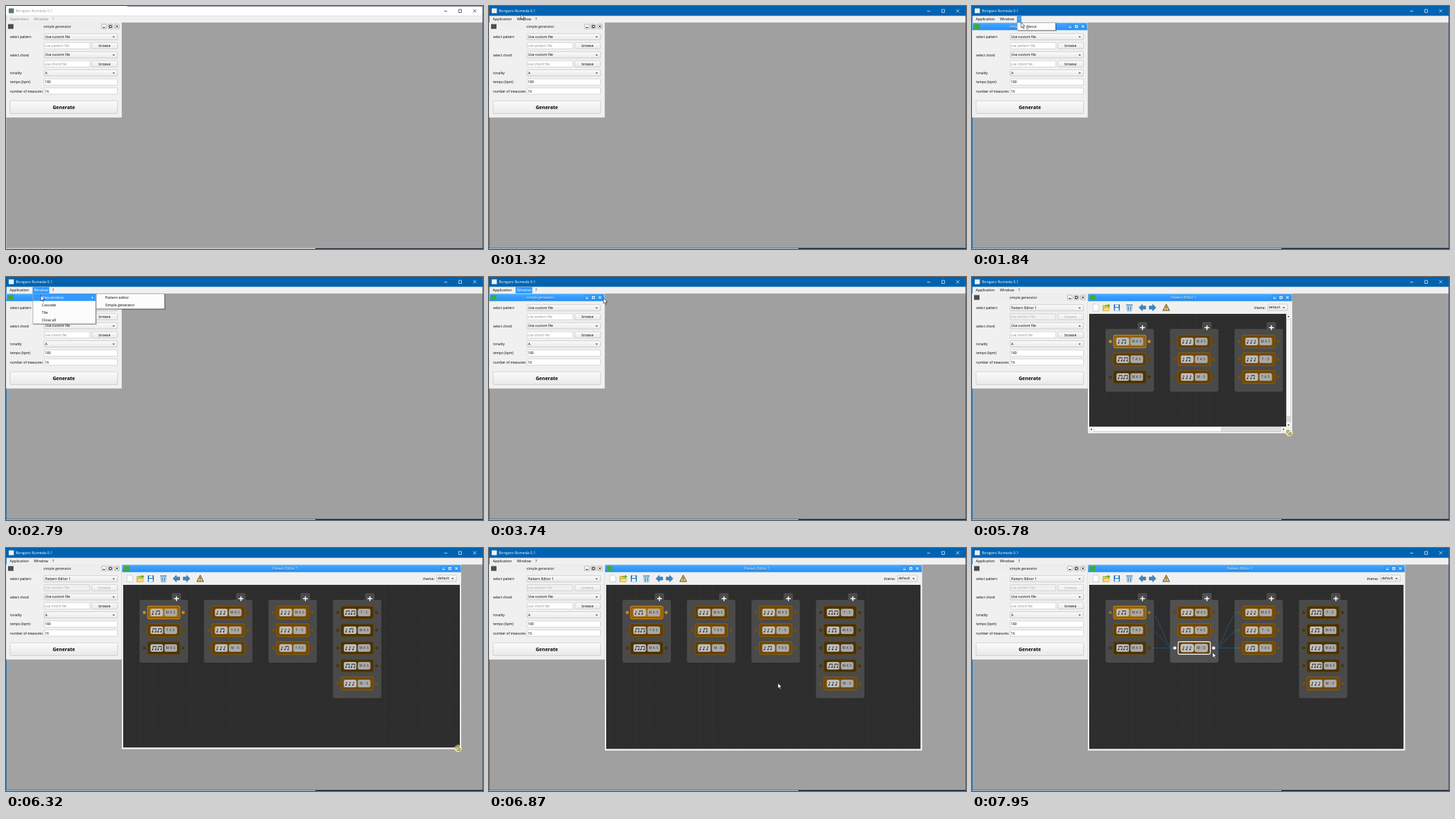
Write an HTML page that moves like this. It is 700 by 356 pixels and loops after 8000 ms.

```html
<!DOCTYPE html>
<html lang="en">
<head>
<meta charset="utf-8">
<title>Pattern editor demo</title>
<style>
  html, body { margin: 0; width: 100%; height: 100%; overflow: hidden; background: #a0a0a0; }
  svg { display: block; width: 700px; height: 356px; }
  text { font-family: "Open Sans", "Noto Sans", sans-serif; white-space: pre; }
</style>
</head>
<body>
<svg id="stage" viewBox="0 0 700 356" xmlns="http://www.w3.org/2000/svg">
  <defs>
    <linearGradient id="blue" x2="0" y2="1">
      <stop offset="0" stop-color="#52b0ff"/><stop offset=".25" stop-color="#3ba2ff"/><stop offset="1" stop-color="#2990f5"/>
    </linearGradient>
    <linearGradient id="btn" x2="0" y2="1">
      <stop offset="0" stop-color="#fbfbfb"/><stop offset="1" stop-color="#e9e9e9"/>
    </linearGradient>
    <pattern id="grid" width="18.9" height="18.9" x="177" y="57" patternUnits="userSpaceOnUse">
      <path d="M0 .25H18.9M.25 0V18.9" stroke="#343434" stroke-width=".6"/>
    </pattern>
  </defs>
  <g id="scene"></g>
</svg>
<script>
const LOOP = 8000;
const APP = 'Bongaro Rumeda 0.1';

// time, then the properties that change
const STEPS = [
  [0, { active: false, menu: '', hot: '', focus: '', item: -1, edges: false, sel: false }],
  [1320, { active: true }],
  [1450, { focus: 'gen' }],
  [1590, { menu: 'window', hot: 'window' }],
  [1840, { menu: 'help', hot: 'help' }],
  [2250, { menu: 'window', hot: 'window' }],
  [2380, { item: 0 }],
  [2660, { sub: true }],
  [3180, { subItem: 0 }],
  [3740, { menu: '', sub: false, item: -1 }],
  [3870, { hot: '', focus: 'edit', size: [395, 203] }],
  [4000, { linked: true }],
  [5650, { size: [432, 216] }],
  [5780, { size: [470, 229] }],
  [5930, { size: [570, 262] }],
  [6050, { size: [677, 292] }],
  [6320, { size: [668, 294.5] }],
  [6470, { size: [656, 297] }],
  [6600, { size: [641, 297] }],
  [6730, { size: [635.5, 296.6] }],
  [7390, { sel: true }],
  [7670, { edges: true }]
];

// time, x, y, shape: a(rrow), r(esize), p(ressed resize); none hides it
const POINTER = [
  [0], [370, 620, 343, 'a'], [500, 264, 66, 'a'], [630],
  [910, 47, 1, 'a'], [1040, 47, 8, 'a'], [1170, 47, 12, 'a'],
  [1590, 50, 15, 'a'], [1720, 62, 18, 'a'], [1840, 72, 24, 'a'], [2100, 70, 19, 'a'],
  [2250, 57, 18, 'a'], [2380, 53, 24, 'a'], [2530, 51, 27, 'a'],
  [3060, 85, 28, 'a'], [3180, 135, 27, 'a'], [3310, 162, 25, 'a'],
  [3590, 167, 27, 'a'], [3740, 168, 31, 'a'], [3870],
  [4280, 285, 71, 'a'], [4410, 350, 142, 'a'], [4540, 392, 190, 'a'],
  [4690, 392, 198, 'r'], [4820, 393, 204, 'r'], [4970, 392.5, 202, 'r'],
  [5240, 393, 203, 'p'], [6600],
  [6870, 424, 198, 'a'], [7000, 388, 181, 'a'], [7130, 360, 164, 'a'],
  [7260, 340, 153, 'a'], [7390, 332, 152, 'a'], [7950, 353, 153, 'a']
];

// columns of nodes: shade, notes, label
const COLUMNS = [
  ['O qb MAS', 'B bb TAS', 'D bb MAS'],
  ['B qqq MAS', 'M qb TAS', 'B qqq M-S'],
  ['M qqq MAS', 'M qqq T-S', 'M qb TAS'],
  ['D bb T-S', 'D qb MAS', 'D qqq MAS', 'D bb MAS', 'M qqq M-S']
];
const SHADES = {
  O: ['#a66c0b', '#d08c17'], M: ['#7a4f05', '#8f5f08'],
  B: ['#684303', '#7b5107'], D: ['#4d3403', '#5f4107']
};

const rect = (x, y, w, h, fill, more = '') =>
  `<rect x="${x}" y="${y}" width="${w}" height="${h}" fill="${fill}" ${more}/>`;
const path = (d, stroke, width = .7, fill = 'none') =>
  `<path d="${d}" stroke="${stroke}" stroke-width="${width}" fill="${fill}"/>`;
const text = (x, y, s, size = 5.1, fill = '#000', more = '') =>
  `<text x="${x}" y="${y}" font-size="${size}" fill="${fill}" ${more}>${s}</text>`;
const dot = (x, y, r, fill) => `<circle cx="${x}" cy="${y}" r="${r}" fill="${fill}"/>`;
const line = (c, w = .5) => `stroke="${c}" stroke-width="${w}"`;
const MID = 'text-anchor="middle"';

function mainFrame(s) {
  const ink = s.active ? '#fff' : '#999';
  const edge = s.active ? '#0063b1' : '#c4c8ce';
  const menuInk = s.active ? '#000' : '#8a8a8a';
  let out = rect(0, 0, 700, 356, '#a0a0a0') + rect(0, 0, 700, 14.5, s.active ? '#0063b1' : '#fff');
  if (!s.active) out += rect(178, 0, 522, .6, '#26364e');
  out += rect(4, 3.5, 7.5, 7, s.active ? '#eef0ee' : '#5c7468') +
    text(14.5, 9.2, APP, 5.5, ink) +
    path('M643 7.5h4.5M664.5 5h4v4.5h-4zM685.5 4.8l4.6 4.6M690.1 4.8l-4.6 4.6', s.active ? '#fff' : '#222', .7) +
    rect(0, 14.5, 700, 9.7, '#f0f0f0');
  if (s.hot === 'window') out += rect(39, 14.7, 24.5, 9.3, '#3399ff');
  if (s.hot === 'help') out += rect(66, 14.7, 6.5, 9.3, '#3399ff');
  out += text(5.5, 21.3, 'Application', 5.4, menuInk) +
    text(41, 21.3, 'Window', 5.5, s.hot === 'window' ? '#fff' : menuInk) +
    text(68, 21.3, '?', 5.4, s.hot === 'help' ? '#fff' : menuInk);
  return out + rect(0, 14, .7, 342, edge) + rect(699.2, 0, .8, 356, '#4a5a72') +
    rect(0, 354.5, 700, .8, edge) + rect(0, 355.3, 454, .7, '#d5dbe2') + rect(454, 354.8, 246, 1.2, '#1b222e');
}

function subWindow(x, r, b, title, active) {
  const ink = active ? '#fff' : '#111';
  const mid = (x + r) / 2 - 9.5;
  let out = rect(x + .3, 24.6, r - x - .6, b - 24.9, '#f0f0f0', line('#fbfbfb', .6)) +
    rect(x + .3, 24.6, r - x - .6, 10.8, active ? 'url(#blue)' : '#eee') +
    rect(x + 3, 26.5, 8, 7, active ? '#46a834' : '#4a4e54');
  if (active) out += text(mid, 32.7, title, 5.1, '#174a78', MID);
  out += text(mid, 32.3, title, 5.1, ink, MID);
  for (const c of [26, 16.5, 7])
    out += rect(r - c - 3.4, 26.6, 6.8, 6.6, active ? '#46a6fb' : '#f8f8f8', `rx=".8" ${line(active ? '#1c6dbb' : '#777')}`);
  return out + path(`M${r - 27.7} 31.4h3.4M${r - 18.2} 28.4h3.4v3.2h-3.4zM${r - 8.6} 28.3l3.2 3.2m0-3.2l-3.2 3.2`, active ? '#fff' : '#000', .9);
}

function combo(x, y, w, value) {
  const a = x + w - 5.5, c = y + 4;
  return rect(x, y, w, 9.2, 'url(#btn)', `rx=".8" ${line('#aaa')}`) +
    text(x + 1.5, y + 6.5, value) + path(`M${a - 1.7} ${c}h3.4l-1.7 2z`, 'none', 0, '#444');
}

const field = (y, value, w = 107.5, ink = '#000', fill = '#fff') =>
  rect(56, y, w, 9.2, fill, `rx=".6" ${line('#b2b2b2')}`) + text(57, y + 6.5, value, 5.1, ink);

const button = (x, y, w, h, label, size, ink, more = '') =>
  rect(x, y, w, h, 'url(#btn)', `rx="1" ${line('#b0b0b0')}`) +
  text(x + w / 2, y + h / 2 + size * .36, label, size, ink, MID + more);

function generator(s) {
  const off = s.linked;
  const labels = [['select pattern', 45], ['select chord', 71.6], ['tonality', 98], ['tempo (bpm)', 111.5], ['number of measures', 124.7]];
  return subWindow(0, 169.7, 163.3, 'simple generator', s.focus === 'gen') +
    labels.map(([t, y]) => text(6, y + 1.9, t, 4.9)).join('') +
    combo(56, 40.4, 107.5, off ? 'Pattern Editor 1' : 'Use custom file') +
    field(53.6, 'use pattern file', 67, off ? '#b4b4b4' : '#8c8c8c', off ? '#f0f0f0' : '#fff') +
    button(126, 53.6, 37.5, 9.2, 'browse', 5.1, off ? '#aaa' : '#000') +
    combo(56, 66.9, 107.5, 'Use custom file') +
    field(80.1, 'use chord file', 67, '#8c8c8c') +
    button(126, 80.1, 37.5, 9.2, 'browse', 5.1, '#000') +
    combo(56, 93.4, 107.5, 'A') + field(106.8, '180') + field(120, '16') +
    button(6, 139, 157.7, 18.5, 'Generate', 7.1, '#000', ' font-weight="700"');
}

function toolbar(r) {
  const arrow = (x, d) => path(`M${x} 44.8l${5 * d} -5v2.7h${5 * d}v4.6h${-5 * d}v2.7z`, '#1d5e93', .5, '#3c87c4');
  return path('M177.5 39.5h6l2.5 2.5v7.8h-8.5z', '#aaa', .5, '#fdfdfd') +
    path('M192 41.5h4l1 1.5h4v6.5h-9z', '#b08a20', .5, '#f0c63e') +
    path('M194 45h8.5l-2 4.5h-8.5z', '#b08a20', .4, '#ffe27a') +
    path('M195 43.5q1.5-4.5 5-2.5v-2l3 3.5-4.5 1 1-1.2q-2.500-1-4.500 1.200z', 'none', 0, '#3fae2a') +
    rect(208, 40, 9, 9.5, '#2f7fc6', 'rx=".8"') + rect(210, 40.5, 5, 3.5, '#e8f0f8') + rect(209.6, 45.3, 5.8, 4, '#fff') +
    path('M227 41.5h8l-1 8.3h-6z', '#4b7fa8', .5, '#b5d6ec') + path('M226 40.7h10M229.5 43v5.5M232.5 43v5.5', '#3a7db5', .9) +
    arrow(245, 1) + arrow(270, -1) +
    path('M285 39.8l5 9.3h-10z', '#4a3b1a', .9, '#f2c46c') + path('M285 42.8v3.2m0 .8v1', '#222', .9) +
    text(r - 56, 46.7, 'theme:') + combo(r - 36, 39.9, 29, 'default');
}

// small beamed and single notes
function notes(x, y, kind) {
  let out = '', step = kind === 'bb' ? 8 : 5.2;
  [...kind].forEach((k, i) => {
    const n = x + 3 + i * step;
    out += dot(n, y + 2.3, 1, '#222') + path(`M${n + .7} ${y + 2}v-4.5`, '#222', .6);
    if (k === 'b') out += dot(n + 4.5, y + 2.3, 1, '#222') +
      path(`M${n + 5.2} ${y + 2}v-4.5`, '#222', .6) + path(`M${n + .4} ${y - 2.3}h5`, '#222', 1);
    else out += path(`M${n + .7} ${y - 2.3}l1.4 1.6`, '#222', .7);
  });
  return out;
}

const colX = c => 196 + c * 94.6;
const rowY = n => 94.5 + n * 26;

function node(c, n, spec, selected, linked) {
  const [shade, kind, label] = spec.split(' ');
  const [fill, edge] = SHADES[shade];
  const x = colX(c) + 12, y = rowY(n);
  const port = selected && linked ? '#fff' : shade === 'O' && !linked ? edge : fill;
  const rim = selected ? line('#eee', .7) : '';
  return dot(x - 5, y, 2.3, port) + dot(x + 52, y, 2.3, port) +
    rect(x, y - 9, 47, 18, fill, `rx="1.8" ${line(selected ? '#fff' : edge, 1.3)}`) +
    rect(x + 1, y - 8, 45, 16, 'none', `rx="1" ${line('#3b2603', .5)}`) +
    rect(x + 4, y - 5.5, 18.5, 11, '#bdbdbd', `rx="2.5" ${rim}`) + notes(x + 4, y, kind) +
    rect(x + 24.5, y - 5.5, 18.5, 11, '#a9a9a9', `rx="2.5" ${rim}`) +
    text(x + 33.7, y + 1.7, [...label].join(' '), 4.5, '#222', MID + ' letter-spacing=".4"');
}

function curve(x1, y1, x2, y2) {
  const bend = (x2 - x1) * .42;
  return path(`M${x1} ${y1}C${x1 + bend} ${y1} ${x2 - bend} ${y2} ${x2} ${y2}`, '#1d5c88', .9) +
    path(`M${x2 - 2} ${y2}l-3.5-1.5v3z`, 'none', 0, '#2470a0');
}

function graph(s) {
  let out = '';
  COLUMNS.forEach((list, c) => {
    const x = colX(c), fill = s.sel && c === 1 ? '#515151' : '#4a4a4a';
    out += path(`M${x + 47} 76v-8q0-2 2-2h10q2 0 2 2v8z`, 'none', 0, fill) +
      rect(x, 76, 71, list.length * 26 + 14, fill, 'rx="3"') +
      path(`M${x + 50.7} 74.3h7m-3.5-3.5v7`, '#fff', 1.5);
  });
  if (s.edges) {
    const y = rowY(2);
    for (let n = 0; n < 3; n++)
      out += curve(colX(0) + 64, rowY(n), colX(1) + 7, y) + curve(colX(1) + 64, y, colX(2) + 7, rowY(n));
  }
  COLUMNS.forEach((list, c) => list.forEach((spec, n) => {
    out += node(c, n, spec, s.sel && c === 1 && n === 2, s.edges);
  }));
  return out;
}

function scrollbars(vr, vb) {
  const h = (vr - 172) / 425 * (vr - 186), v = (vb - 54) / 176 * (vb - 68);
  return rect(vr, 54, 7, vb - 54, '#dcdcdc') + rect(172, vb, vr - 165, 7.5, '#dcdcdc') +
    rect(vr + .3, 54.3, 6.4, vb - 54.6, 'none', line('#b5b5b5')) +
    rect(172.3, vb + .3, vr - 172.6, 6.9, 'none', line('#b5b5b5')) +
    rect(vr + .3, 54.3, 6.4, 7.2, '#f8f8f8') + rect(vr + .3, vb - 7, 6.4, 6.8, '#f8f8f8') +
    rect(172.3, vb + .3, 6.7, 6.9, '#f8f8f8') + rect(vr - 7, vb + .3, 6.7, 6.9, '#f8f8f8') +
    rect(vr + .3, 62, 6.4, v, '#fafafa', line('#b5b5b5')) +
    rect(179, vb + .3, h, 6.9, '#fafafa', line('#b5b5b5')) +
    rect(vr, vb, 7, 7.5, '#f0f0f0') +
    path(`M${vr + 2} 58.7h3l-1.5-2zM${vr + 2} ${vb - 3.5}h3l-1.5 2zM176 ${vb + 2.2}v3l-2-1.5zM${vr - 4.5} ${vb + 2.2}v3l2-1.5z`, 'none', 0, '#222');
}

function editor(s) {
  if (!s.size) return '';
  const [r, b] = s.size;
  const bars = r - 174 < 425;
  const vr = bars ? r - 9 : r - 2, vb = bars ? b - 9.5 : b - 2;
  const w = vr - 172, h = vb - 54;
  return subWindow(170, r, b, 'Pattern Editor 1', s.focus === 'edit') + toolbar(r) +
    `<clipPath id="view">${rect(172, 54, w, h, '#000')}</clipPath><g clip-path="url(#view)">` +
    rect(172, 54, w, h, '#2d2d2d') + rect(172, 54, w, h, 'url(#grid)') + graph(s) + '</g>' +
    (bars ? scrollbars(vr, vb) : '');
}

function popup(x, w, items, picked) {
  const h = items.length * 11 + 1;
  return rect(x + 1, 25, w, h, '#000', 'opacity=".3"') +
    rect(x + .3, 24.3, w - .6, h - .6, '#fcfcfc', line('#777')) +
    items.map((t, i) => {
      const on = i === picked, y = 24.6 + i * 11;
      return (on ? rect(x + .8, y, w - 1.6, 10.5, '#3399ff') : '') + text(x + 13.5, y + 7.2, t, 5.4, on ? '#fff' : '#000');
    }).join('');
}

function menus(s) {
  if (s.menu === 'help') return popup(66, 57, ['<tspan text-decoration="underline">A</tspan>bout'], -1);
  if (s.menu !== 'window') return '';
  return popup(39, 93, ['New window', 'Cascade', 'Tile', 'Close all'], s.item) +
    path('M126 28.5v3.6l2-1.8z', 'none', 0, s.item === 0 ? '#fff' : '#222') +
    (s.sub ? popup(132, 101, ['Pattern editor', 'Simple generator'], s.subItem) : '');
}

function pointer([, x, y, shape], size) {
  if (!shape) return '';
  if (shape === 'a')
    return path(`M${x} ${y}v7.8l1.9-1.7 1.3 3 1.3-.6-1.3-2.9h2.5z`, '#111', .6, '#fff');
  if (shape === 'p' && size) { x = size[0] - 4.5; y = size[1] - .8; }
  return (shape === 'p' ? dot(x, y, 5.5, 'rgba(248,240,130,.7)') : '') +
    path(`M${x - 3.3} ${y - 3.3}h3.2l-1 1 2.7 2.7 1-1v3.2h-3.2l1-1-2.7-2.7-1 1z`, '#111', .6, '#fff');
}

const scene = document.getElementById('scene');
let shown = '';

function draw(now) {
  const t = now % LOOP;
  const past = STEPS.filter(([at]) => at <= t);
  const mark = POINTER.filter(([at]) => at <= t).pop();
  const key = past.length + ':' + mark[0];
  if (key !== shown) {
    shown = key;
    const s = Object.assign({}, ...past.map(([, change]) => change));
    scene.innerHTML = mainFrame(s) + generator(s) + editor(s) + menus(s) + pointer(mark, s.size);
  }
}

let start;
function tick(now) {
  start ??= now;
  draw(now - start);
  requestAnimationFrame(tick);
}
draw(0);
requestAnimationFrame(tick);
</script>
</body>
</html>
```
